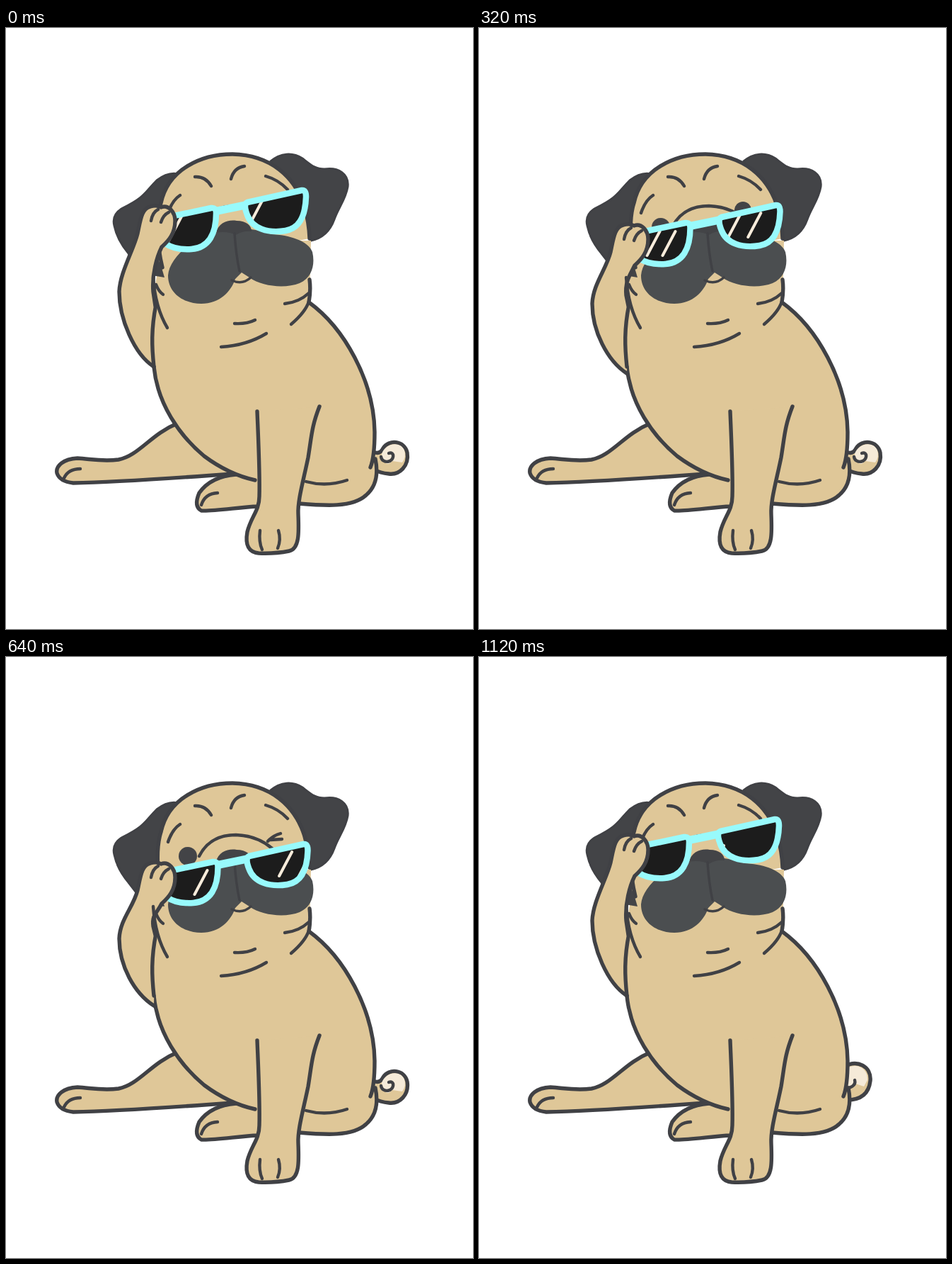
Write an HTML page that moves like this. It is 660 by 848 pixels and loops after 1.2 s.

```html
<!DOCTYPE html>
<html lang="en">
<head>
<meta charset="utf-8">
<title>Pug with sunglasses</title>
<style>
  html, body { margin: 0; width: 100%; height: 100%; overflow: hidden; background: #fff; }
  svg { display: block; width: 100%; height: 100%; fill: none; stroke-linecap: round; stroke-linejoin: round; }
  .ink { stroke: #404145; stroke-width: 5.4; }
  .thin { stroke: #404145; stroke-width: 4.4; }
  .fine { stroke: #404145; stroke-width: 3.5; }
  .fur { fill: #dfc798; }
  .ear { fill: #434447; stroke: #404145; stroke-width: 3; }
  .dark { fill: #434447; }
  .muzzle { fill: #4b4e50; }
  .cream { fill: #f5ead8; }
  .lens { fill: #1c1c1c; }
  .frame { stroke: #98fafc; stroke-width: 8.5; }
  .bridge { stroke: #98fafc; stroke-width: 11; stroke-linecap: butt; }
  .glare { stroke: #f8ecdb; stroke-width: 4; }
</style>
</head>
<body>
<svg viewBox="0 0 660 848">
  <defs>
    <path id="lenses" d="M228 267L290 254Q297 253 297 261C297 290 287 310 262 312C245 313 232 309 225 304Z
      M341 246L418 229Q424 228 424 238C423 270 412 283 395 286C370 290 348 283 341 264Q335 249 341 246Z"/>
    <clipPath id="inLens"><use href="#lenses"/></clipPath>
  </defs>

  <!-- tail poses: middle, low, high -->
  <g class="tail">
    <path class="fur ink" d="M522 599Q529 601 533 593C541 580 563 582 567 599C570 618 556 631 541 629Q529 628 520 623"/>
    <path class="cream" d="M531 601C536 586 557 582 563 596Q566 605 560 613L546 611L541 615Q532 615 531 601Z"/>
    <path class="thin" d="M530 605C532 616 549 613 547 602Q545 598 541 600"/>
  </g>
  <g class="tail">
    <path class="fur ink" d="M520 602Q530 610 540 604C557 597 571 609 570 623C569 639 555 647 540 644Q528 642 520 636"/>
    <path class="cream" d="M542 607C556 601 568 611 567 623Q565 635 553 640L550 628Q538 622 542 607Z"/>
    <path class="thin" d="M539 606C531 616 539 626 550 624"/>
  </g>
  <g class="tail">
    <path class="fur ink" d="M516 578C535 567 555 578 553 598C551 616 540 625 520 625"/>
    <path class="cream" d="M520 580C535 572 550 581 549 597L544 606L532 602L527 608L518 606Z"/>
    <path class="thin" d="M516 607C525 610 533 604 531 597"/>
  </g>

  <!-- ears -->
  <path class="ear" d="M250 208Q232 200 213 215C195 233 197 238 165 254Q149 263 153 279Q157 299 173 318L190 340L224 351L235 250Z"/>
  <path class="ear" d="M374 188C388 176 405 175 419 184C432 194 437 199 450 199C470 196 485 206 483 224C480 242 470 253 464 270Q455 295 431 300L400 230Z"/>

  <!-- back legs -->
  <path class="fur ink" d="M242 558C205 573 187 604 159 609C135 612 120 608 101 607C81 608 70 618 72 628Q76 640 95 642C150 641 240 635 322 629"/>
  <path class="thin" d="M82 635Q88 622 105 622"/>
  <path class="fur ink" d="M325 630C298 632 283 642 273 656Q265 675 276 681C295 682 330 676 356 675L380 640"/>
  <path class="thin" d="M276 673Q281 657 299 656"/>

  <!-- torso -->
  <path class="fur" d="M213 350C204 400 206 440 209 478C214 530 245 575 280 604Q315 630 352 638L360 672H415C450 676 485 677 505 663Q526 650 523 625L521 600C526 530 495 440 429 387L431 300H217Z"/>
  <path class="ink" d="M209 478C214 530 245 575 280 604Q315 630 352 638"/>
  <path class="ink" d="M429 355Q431 370 428 387C478 423 520 498 521 570Q521 605 515 620M522 608Q529 642 509 659C490 677 450 674 414 671"/>
  <path class="thin" d="M424 640Q453 648 482 638"/>

  <!-- front leg -->
  <path class="fur ink" d="M355 541C357 590 359 630 358 661C358 681 346 690 341 711Q336 739 357 741Q380 742 400 738C415 735 414 711 413 686C412 667 420 640 427 606C432 575 432 562 443 534"/>
  <path class="thin" d="M359 709Q357 725 362 736M385 709Q389 722 384 734"/>

  <!-- head -->
  <path class="fur ink" d="M221 338C213 305 212 268 219 247C229 200 275 178 320 178C375 179 408 211 421 250Q428 272 429 297"/>
  <path class="dark" d="M211 318Q218 330 224 352L206 349Z"/>
  <path class="thin" d="M267 210Q282 209 290 223M318 213Q322 197 337 195M367 209Q385 214 398 228M229 261Q235 243 246 236"/>
  <path class="thin" d="M273 281C284 259 304 251 325 251Q355 252 376 270"/>
  <circle class="dark" cx="257" cy="281" r="13"/>
  <circle class="dark" id="eye" cx="373" cy="257" r="12"/>
  <path class="thin" id="wink" d="M370 260Q377 252 388 249M374 258L390 257"/>
  <path class="muzzle" d="M300 288C270 292 231 322 229 349C229 375 252 389 276 389C302 389 318 372 324 354L333 345L344 352C362 365 395 368 415 360C433 352 437 333 433 316C427 300 400 292 375 291Q342 280 323 284Z"/>
  <path class="dark" d="M297 289C300 274 315 270 326 272C340 272 347 279 347 287Q334 286 325 292Q312 286 297 289Z"/>
  <path class="fine" d="M323 290Q325 320 330 343M319 356Q334 363 346 352"/>
  <path class="thin" d="M323 417Q340 418 352 412M304 450Q340 448 368 431M394 389Q414 387 428 374M403 418Q423 401 428 386"/>

  <g id="glasses">
    <use href="#lenses" class="lens"/>
    <g clip-path="url(#inLens)"><path id="glare" class="glare"/></g>
    <use href="#lenses" class="frame"/>
    <path class="bridge" d="M299 258L338 250"/>
  </g>

  <!-- raised arm -->
  <path class="fur ink" id="arm"/>
  <path class="thin" id="toes" d="M205 272Q207 260 215 256M219 274Q222 264 230 260"/>
  <path class="ink" d="M212 390C205 425 206 450 209 478"/>
  <path class="thin" d="M208 352C210 380 216 403 228 423M212 362Q216 372 222 376"/>
</svg>

<script>
const STEP = 80, COUNT = 15;
const glassDrop = [0, 5, 10, 15, 21, 28, 35, 41];
const pawDrop = [0, 7, 14, 20, 26, 33, 39, 45];
const tailOrder = [0, 1, 0, 2];
const $ = id => document.getElementById(id);
const tails = document.querySelectorAll('.tail');
const show = (el, on) => el.style.display = on ? '' : 'none';

function armPath(p) {
  const y = v => v + p;            // paw
  const e = v => v + p * 0.65;     // elbow
  const b = v => v + p * 0.36;     // shoulder
  return `M209 ${b(478)}C181 ${b(460)} 160 ${e(410)} 160 ${e(372)}
    C161 ${e(345)} 180 ${y(314)} 186 ${y(290)}C190 ${y(271)} 192 ${y(254)} 204 ${y(252)}
    Q213 ${y(249)} 219 ${y(253)}C230 ${y(249)} 239 ${y(260)} 239 ${y(272)}
    C239 ${y(290)} 230 ${y(300)} 220 ${y(309)}
    C213 ${y(323)} 206 ${348 + p * 0.4} 208 ${372 + p * 0.2}L211 392`;
}

const streak = (x, y) => `M${x - 9} ${y + 17}L${x + 9} ${y - 17}`;

function draw(k) {
  const level = 7 - Math.abs(7 - k);
  const drop = glassDrop[level], paw = pawDrop[level];
  $('glasses').setAttribute('transform', `translate(${drop / 14} ${drop})`);
  const left = 217 + 7 * k, right = 327 + 8.2 * k;
  $('glare').setAttribute('d',
    streak(left, 283) + streak(left + 22, 283) + streak(right, 257) + streak(right + 28, 257));
  $('arm').setAttribute('d', armPath(paw));
  $('toes').setAttribute('transform', `translate(0 ${paw})`);
  show($('wink'), level > 5);
  show($('eye'), level <= 5);
  const pose = tailOrder[Math.floor(k % 8 / 2)];
  tails.forEach((tail, i) => show(tail, i === pose));
}

const start = performance.now();
function tick() {
  const time = Math.max(0, performance.now() - start);
  draw(Math.floor(time / STEP) % COUNT);
  requestAnimationFrame(tick);
}
draw(0);
requestAnimationFrame(tick);
</script>
</body>
</html>
```
